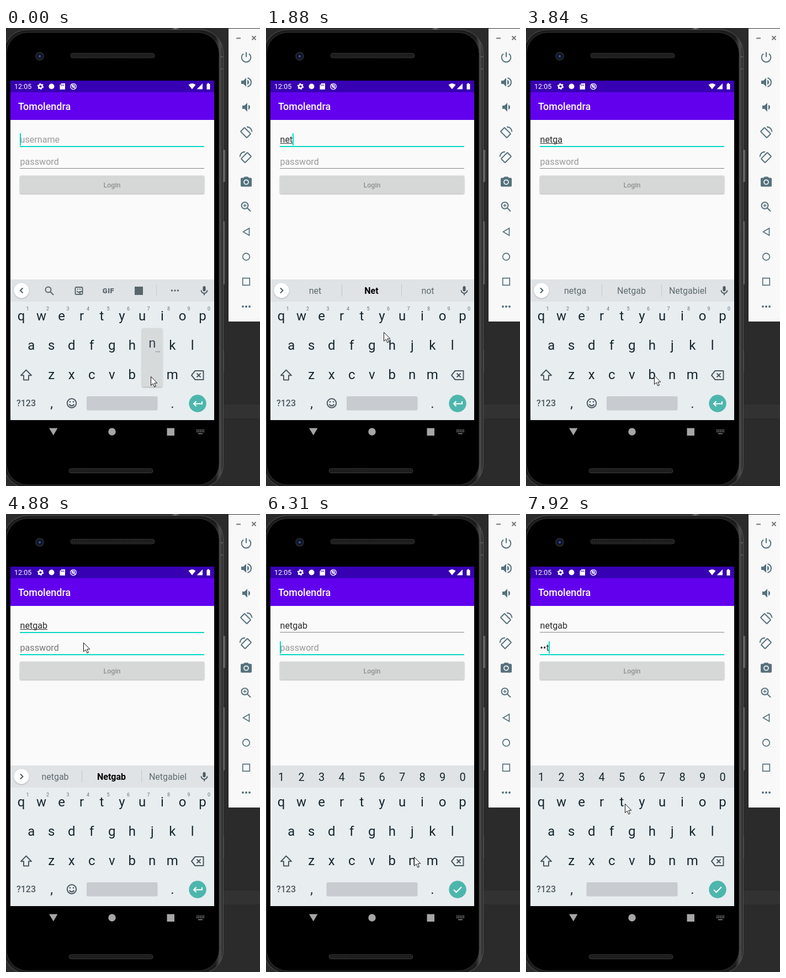
These frames come from a looping animation (460 by 827 pixels, 8 s). An HTML page:

```html
<!DOCTYPE html>
<html lang="en">
<head>
<meta charset="utf-8">
<title>Login typing</title>
<style>
html, body { margin: 0; height: 100%; overflow: hidden; background: #2b2b2b }
svg { display: block; width: 100vw; height: 100vh; font-family: Roboto, sans-serif }
.mid text, text.mid { text-anchor: middle }
.line { fill: none; stroke-width: 2 }
.dots { fill: none; stroke-linecap: round }
.keys { font-size: 24px; fill: #14262e }
.small { font-size: 9px; fill: #68747a }
.field { font-size: 16.15px; white-space: pre }
.sug { font-size: 16px; fill: #5f6b70 }
</style>
</head>
<body>
<svg viewBox="0 0 460 827">
  <defs>
    <linearGradient id="rim"><stop offset=".965" stop-color="#1c1c1c"/><stop offset=".985" stop-color="#4c4c4c"/><stop offset="1" stop-color="#262626"/></linearGradient>
    <linearGradient id="side"><stop offset="0" stop-color="#222"/><stop offset=".5" stop-color="#777"/><stop offset="1" stop-color="#333"/></linearGradient>
    <pattern id="mesh" width="3" height="3" patternUnits="userSpaceOnUse"><path fill="#111" d="M0 0h3v3H0z"/><path fill="#444" d="M0 0h1.5v1.5H0z"/></pattern>
    <filter id="shade" x="-20%" y="-20%" width="140%" height="140%"><feDropShadow dx="0" dy="1" stdDeviation="1.2" flood-opacity=".3"/></filter>
  </defs>

  <!-- surroundings and phone body -->
  <path fill="#2b2b2b" d="M0 0h460v827H0z"/>
  <path fill="#323232" d="M390 680h70v25h-70z"/>
  <g fill="url(#side)">
    <rect x="391" y="220" width="7" height="58" rx="2"/>
    <rect x="391" y="349" width="6" height="114" rx="2"/>
    <rect x="391" y="582" width="4" height="39" rx="1"/>
    <rect x="299" y="0" width="15" height="5"/>
  </g>
  <rect x="-4" y="3" width="397.500" height="827" rx="42" fill="url(#rim)" stroke="#555"/>
  <rect x="1" y="8" width="385" height="817" rx="38" fill="#000" stroke="#343434"/>
  <path fill="#555" d="M388 51h6v2h-6zM388 73h6v2h-6z"/>
  <g fill="url(#mesh)" stroke="#333">
    <rect x="117" y="45.5" width="152" height="8.5" rx="4"/>
    <rect x="114" y="795.5" width="152" height="8" rx="4"/>
  </g>
  <circle cx="61" cy="51" r="8" fill="#20242a"/><circle cx="61" cy="51" r="5" fill="#0b0e1c"/><circle cx="61" cy="51" r="2.5" fill="#31468a"/>

  <!-- app -->
  <path fill="#fafafa" d="M8 95h369v613H8z"/>
  <path fill="#3700b3" d="M8 95h369v21H8z"/>
  <path fill="#6200ee" d="M8 116h369v50H8z"/>
  <g fill="#fff">
    <text x="15" y="110" font-size="12.6">12:05</text>
    <text x="22" y="148" font-size="17.95" font-weight="500">Tomolendra</text>
    <g fill="none" stroke="#fff"><circle cx="62.5" cy="105.5" r="3.3" stroke-width="2.4"/><circle cx="62.5" cy="105.5" r="5" stroke-width="1.6" stroke-dasharray="2.6"/></g>
    <circle cx="82.5" cy="105.5" r="5"/>
    <path d="M100.5 100h6.5v11h-9.5v-8z"/>
    <path d="M100 102v2.5m2.2-2.5v2.5m2.2-2.5v2.5" stroke="#3700b3"/>
    <g fill="none" stroke="#fff" stroke-width="1.3"><circle cx="122" cy="105.5" r="5.2"/><circle cx="122" cy="105" r="2.3"/><path d="M118.5 102l7 7"/></g>
    <path d="M330.5 102.5q6.500-5 13 0l-6.500 8zM356 100v10.5h-10.500zM363.5 101h1.5v-1.500h2.5v1.5h2v10h-6z"/>
  </g>
  <rect x="25" y="266.5" width="334" height="32.5" rx="2" fill="#d6d7d7" filter="url(#shade)"/>
  <text class="mid" x="192" y="288" font-size="12.5" font-weight="500" fill="#8f9090">Login</text>
  <text id="user" class="field" x="25.5" y="207"/>
  <text id="pass" class="field" x="25.5" y="247"/>
  <rect id="compose" x="25.5" y="208" height="1" fill="#333"/>
  <rect id="userLine" x="25" y="213" width="334"/>
  <rect id="passLine" x="25" y="253" width="334"/>
  <rect id="caret" width="2" height="22" fill="#03dac5"/>

  <!-- keyboard -->
  <path fill="#e8edf0" d="M8 454h369v254H8z"/>
  <path fill="#dfe3e6" d="M8 454h369v40H8z"/>
  <g id="letters" class="keys mid"></g>
  <g id="plainKeys">
    <g id="hints" class="small mid"></g>
    <circle cx="28" cy="474" r="13.5" fill="#fff" filter="url(#shade)"/>
    <path id="chevron" class="line" stroke="#455a64" stroke-width="1.7"/>
    <rect x="356.5" y="466" width="5" height="9.500" rx="2.5" fill="#4d5a61"/>
    <path class="line" stroke="#4d5a61" stroke-width="1.6" d="M353.5 473.500a5.5 5.5 0 0 0 11 0M359 479v3.500"/>
    <g class="line" stroke="#4d5a61" stroke-width="1.8"><circle cx="119" cy="677.5" r="8.2"/><path d="M114.5 679.500q4.500 5.500 9 0"/></g>
    <path class="dots" stroke="#4d5a61" stroke-width="2.700" d="M116 675h0M122 675h0"/>
    <g id="tools">
      <g class="line" stroke="#59666c" stroke-width="1.8">
        <circle cx="76.5" cy="472.5" r="5"/><path d="M80 476l6 6"/>
        <rect x="125.500" y="468" width="13" height="13" rx="2"/><path d="M138.500 476h-4.500v5M128.500 475q2.500 4 6 1M129 471.500h2m2 0h2"/>
      </g>
      <path d="M272.5 464v20" stroke="#c8cdd0"/>
      <text class="mid" x="185.5" y="479" font-size="13" font-weight="900" fill="#59666c" letter-spacing=".5">GIF</text>
      <path fill="#59666c" d="M233 467h15v15h-15z"/>
      <path class="dots" stroke="#59666c" stroke-width="3.4" stroke-dasharray="0 5.5" d="M300.5 474h11.500"/>
    </g>
    <g id="words" class="sug mid">
      <path d="M137.5 463v22M245.5 463v22" stroke="#c2c8cb"/>
      <text x="89" y="480"/><text x="191" y="480"/><text x="293" y="480"/>
    </g>
  </g>
  <g id="digits" class="mid" font-size="20" fill="#14262e"></g>
  <g class="line" stroke="#4d5a61" stroke-width="1.8" stroke-linejoin="round">
    <path d="M36.5 617.500l-9.500 9.700h5v8.300h9v-8.300h5z"/>
    <path d="M342.5 619h15v16h-15l-6.500-8zM345.5 623.500l7 7m0-7l-7 7"/>
  </g>
  <text class="mid" x="36.5" y="683" font-size="16" font-weight="500" fill="#4d5a61">?123</text>
  <g class="keys mid"><text x="82.5" y="686">,</text><text x="301.5" y="686">.</text></g>
  <rect id="space" y="665" height="25.5" rx="2.5" fill="#c8ccd0"/>
  <circle cx="347" cy="678" r="15.7" fill="#4db6ac"/>
  <path id="enter" class="line" stroke="#fff"/>
  <g id="popup">
    <rect x="-18.5" y="-92" width="37" height="106" rx="3" fill="#d7dadb" filter="url(#shade)"/>
    <text class="mid" y="-57" font-size="24" fill="#37474f"/>
    <path d="M6.5-49.500h8" stroke="#68747a" stroke-width="1.3" stroke-dasharray="1.5"/>
  </g>

  <!-- navigation bar -->
  <g fill="#a6a6a6">
    <path d="M78 722.5h15.5l-7.700 13zM291.5 722.5h13.5v13.5h-13.500z"/>
    <circle cx="192" cy="729" r="6.7"/>
    <path d="M345 726h14M345 729h14" stroke="#999" stroke-width="1.6" stroke-dasharray="2 1"/><path d="M348 732.500h8" stroke="#999" stroke-width="1.4"/>
  </g>

  <!-- emulator panel -->
  <path fill="#f8f8f8" d="M403 1h57v529h-57z"/>
  <path class="line" stroke="#777" stroke-width="1.4" d="M417 18.5h8M445.5 14.5l7 7m0-7l-7 7"/>
  <g class="line" stroke="#56717d">
    <path d="M435 43.5v9M430 46.500a8.300 8.300 0 1 0 10 0"/>
    <g id="turn"><rect x="-8" y="-5" width="16" height="10" rx="1" transform="translate(434 189) rotate(45)"/><path d="M436 178.500q8.500.5 9.500 9"/></g>
    <use href="#turn" transform="matrix(-1 0 0 1 869 45)"/>
    <circle cx="432.5" cy="320.5" r="6"/><path d="M437 325l6 6"/><path d="M432.5 317.500v6m-3-3h6" stroke-width="1.4"/>
    <path d="M440.5 361.500v13l-11-6.500z" stroke-width="1.7"/>
    <circle cx="435" cy="413" r="6.3" stroke-width="1.7"/>
    <path d="M428.7 451.700h12.600v12.600h-12.600z" stroke-width="1.7"/>
  </g>
  <g fill="#56717d">
    <path id="horn" d="M426 95h4l5-5v16l-5-5h-4zM437 93.500q3 1.500 3 4.500t-3 4.500z"/>
    <path class="line" stroke="#56717d" d="M437.5 90q6.500 2 6.500 8t-6.500 8"/>
    <use href="#horn" x="2" y="45"/>
    <path d="M432 268.500h6l2 2h3q2 0 2 2v12q0 2-2 2h-16q-2 0-2-2v-12q0-2 2-2h3z"/>
    <circle cx="435" cy="278.3" r="4" fill="none" stroke="#f8f8f8" stroke-width="1.7"/>
    <path class="dots" stroke="#56717d" stroke-width="4" stroke-dasharray="0 6" d="M429 503h12.500"/>
  </g>

  <path id="mouse" d="M0 0v16l3.700-3.400 2.600 6 2.600-1.100-2.600-5.900h5z" fill="#fff" stroke="#111"/>
</svg>
<script>
const $ = id => document.getElementById(id);
const LOOP = 8000, STEP = 125, TRAVEL = 300, HOLD = 120, PITCH = 36.5;
const FOCUS = 4760, SECRET = 5000;

const user = { word: 'netgab', presses: [120, 1030, 1510, 2150, 3180, 4230] };
const pass = { word: 'nat', presses: [6430, 7200, 7770] };
const blinks = [0, ...user.presses, SECRET, ...pass.presses];
const popups = [[0, 'n'], [3060, 'a']];

// Where the pointer comes to rest: arrival time, x, y
const stops = [[0, 262, 629], [500, 43, 568], [1000, 95, 527], [1500, 171, 525], [1875, 213, 549],
  [2125, 197, 569], [3000, 48, 574], [3500, 232, 627], [4500, 140, 232], [5375, 266, 594],
  [6200, 268, 619], [7000, 48, 575], [7700, 179, 523]];

const show = (id, on) => $(id).style.display = on ? '' : 'none';
const set = (id, attrs) => { for (const k in attrs) $(id).setAttribute(k, attrs[k]); };

const keyAt = {};
['qwertyuiop', 'asdfghjkl', 'zxcvbnm'].forEach((row, r) =>
  [...row].forEach((c, i) => keyAt[c] = [27.5 + (i + r * (r + 1) / 4) * PITCH, 528 + r * 53]));
const label = (c, x, y) => `<text x="${x}" y="${y}">${c}</text>`;
const numbers = (x, y) => [...'1234567890'].map((c, i) => label(c, x + i * PITCH, y)).join('');
$('letters').innerHTML = Object.keys(keyAt).map(c => label(c, ...keyAt[c])).join('');
$('hints').innerHTML = numbers(39, 510);
$('digits').innerHTML = numbers(27.5, 482);

function pointer(t) {
  const i = Math.max(1, stops.findLastIndex(([at], n) => t >= Math.max(at - TRAVEL, n ? stops[n - 1][0] : 0)));
  const [before, x, y] = stops[i - 1], [at, u, v] = stops[i];
  const from = Math.max(at - TRAVEL, before);
  const k = Math.min(1, Math.max(0, (t - from) / (at - from)));
  const ease = k * k * (3 - 2 * k);
  return [x + (u - x) * ease, y + (v - y) * ease].map(n => Math.round(n) + .5);
}

const typed = (field, t) => field.word.slice(0, field.presses.filter(p => p <= t).length);

// A password letter turns into a dot shortly after the next key
const masked = t => [...typed(pass, t)].map((c, i) => t >= pass.presses[i + 1] + 150 ? '•' : c).join('');

function suggestions(word) {
  if (word.length < 3) return [word, 'no', 'not'];
  return word === 'net' ? [word, 'Net', 'not'] : [word, 'Netgab', 'Netgabiel'];
}

function fillField(id, text, hint, hintColor) {
  $(id).textContent = text || hint;
  set(id, { fill: text ? '#2b2b2b' : hintColor });
  return text ? $(id).getComputedTextLength() : 0;
}

const underline = (id, active) => set(id, { height: active ? 2 : 1, fill: active ? '#03dac5' : '#858585' });

function draw(t) {
  const secret = t >= SECRET, focused = t >= FOCUS, word = typed(user, t);
  const userWidth = fillField('user', word, 'username', '#999');
  const passWidth = fillField('pass', masked(t), 'password', focused && !secret ? '#777' : '#999');
  set('compose', { width: secret ? 0 : userWidth });
  underline('userLine', !secret);
  underline('passLine', focused);
  set('caret', { x: Math.floor(25.5 + (secret ? passWidth : userWidth)), y: secret ? 230 : 190 });
  const sinceBlink = t - blinks.findLast(b => b <= t);
  show('caret', sinceBlink % 1000 < 500 && (t < 4640 || secret));

  show('plainKeys', !secret);
  show('digits', secret);
  show('tools', !word);
  show('words', word);
  set('chevron', { d: word ? 'M26 469.5l4.5 4.5-4.5 4.5' : 'M30.5 469.5l-4.5 4.5 4.5 4.5' });
  const list = suggestions(word), strong = word === 'net' || word === user.word;
  $('words').querySelectorAll('text').forEach((el, i) => {
    el.textContent = list[i];
    el.style.cssText = i === 1 && strong ? 'font-weight:700;fill:#000' : '';
  });
  set('space', secret ? { x: 109.5, width: 165 } : { x: 146, width: 128.5 });
  set('enter', { d: secret ? 'M340 678.5l4.5 4.5 9.5-9.5' : 'M355 674v4.5h-15m4.5-4.5l-4.5 4.5 4.5 4.5' });

  const popup = popups.find(([at]) => t >= at && t < at + HOLD);
  show('popup', popup);
  if (popup) {
    set('popup', { transform: `translate(${keyAt[popup[1]]})` });
    $('popup').querySelector('text').textContent = popup[1];
  }
  set('mouse', { transform: `translate(${pointer(t - t % STEP)})` });
}

const start = performance.now();
function frame() {
  draw((performance.now() - start) % LOOP);
  requestAnimationFrame(frame);
}
frame();
</script>
</body>
</html>
```
